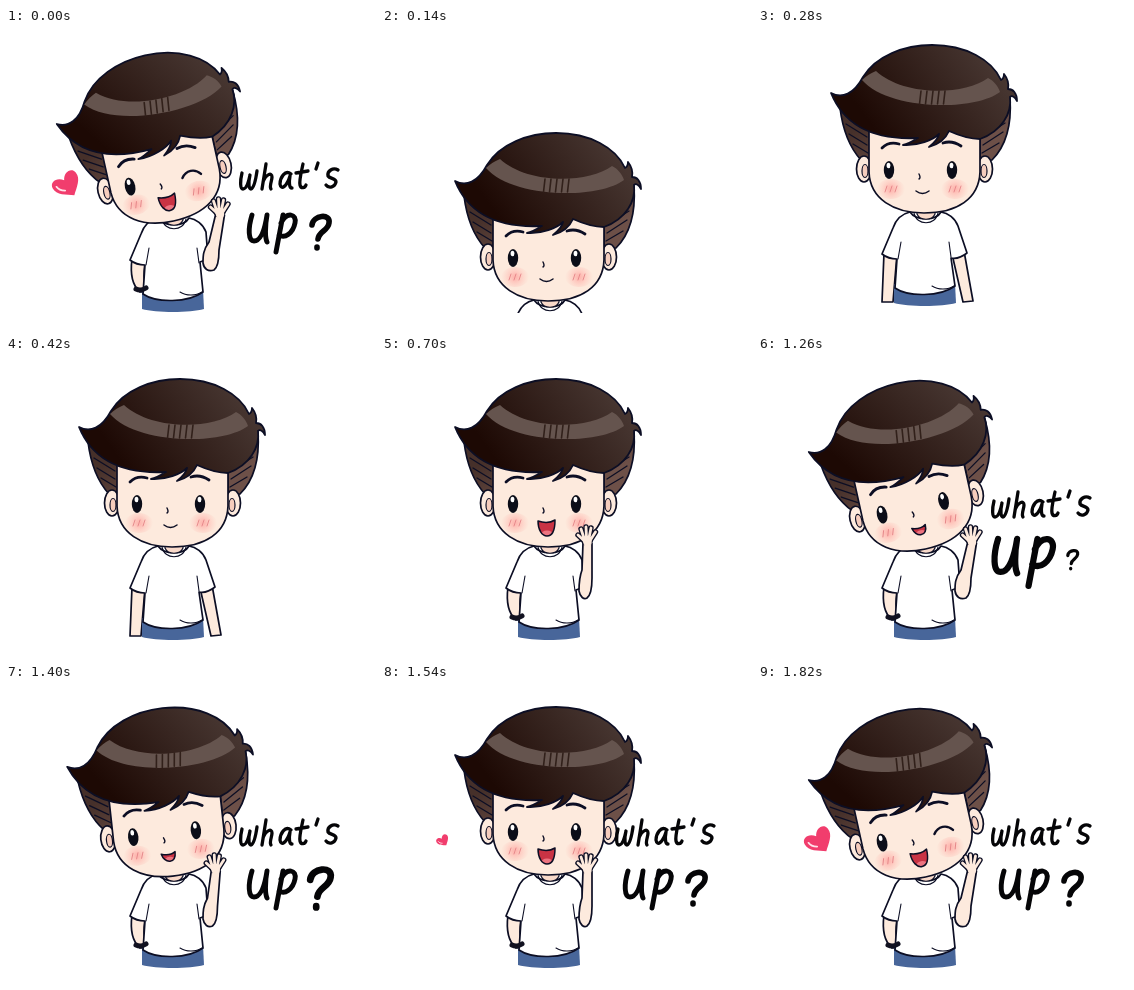
Animation of 370 by 300 pixels, one loop 1.96 s. Source, as an HTML page with a canvas:

```html
<!DOCTYPE html>
<html lang="en">
<head>
<meta charset="utf-8">
<title>what's up?</title>
<style>
html, body { margin: 0; width: 100%; height: 100%; overflow: hidden; background: #fff; }
canvas { display: block; width: 370px; height: 300px; }
</style>
</head>
<body>
<canvas id="stage" width="370" height="300" role="img" aria-label="A boy waves: what's up?"></canvas>
<script>
const ctx = document.getElementById('stage').getContext('2d');
const STEP = 140;
const INK = '#0c0e24', SKIN = '#fdeadd', RED = '#f13d6d';

// Defaults describe the waving boy; each pose lists what differs.
const base = { y: 0, tilt: 0, wave: true, mouth: 'open', wink: false, what: 0, up: 0, ask: 0, heart: 0 };
const idle = { wave: false, mouth: 'closed' };
const poses = [
  { tilt: 1, wink: true, what: 1, up: 1, ask: 1, heart: 1 },
  { ...idle, y: 82 },
  { ...idle, y: -6 },
  idle,
  { ...idle, y: 1 },
  {},
  { what: 0.55 },
  { what: 1.1 },
  { tilt: 0.5, what: 1, up: 0.6 },
  { tilt: 1, mouth: 'grin', what: 1, up: 1.27, ask: 0.58 },
  { tilt: 0.5, mouth: 'grin', what: 1, up: 1, ask: 1.2 },
  { what: 1, up: 1, ask: 1, heart: 0.45 },
  { tilt: 0.5, what: 1, up: 1, ask: 1, heart: 1.2 },
  { tilt: 1, wink: true, what: 1, up: 1, ask: 1, heart: 1 }
].map(p => ({ ...base, ...p }));

const shape = d => new Path2D(d);
const art = {
  hair: shape('M73 71C84 77 96 72 105 55C118 34 146 23 174 23C208 23 234 38 243 58C245 57 246 55 246 52C250 57 251 62 250 67C255 67 259 71 259 79C257 75 254 73 252 75C254 91 244 109 222 117C212 117 202 114 191 109C188 116 182 122 171 125C176 121 180 117 181 112C175 118 160 124 145 123C150 122 155 119 160 116C122 118 88 108 73 71Z'),
  band: shape('M104 58C130 88 215 90 242 70C240 64 236 59 230 56C205 74 145 74 118 49C113 51 108 54 104 58Z'),
  sideL: shape('M82 86C85 110 92 126 103 138L112 142L114 106Z'),
  sideR: shape('M222 110L222 140L234 138C246 126 254 106 252 76Z'),
  strandsL: shape('M88 102L109 115M91 112L109 123M95 122L110 131'),
  strandsR: shape('M247 101L225 115M245 110L225 123M241 121L224 131'),
  face: shape('M111 106L111 150C112 177 136 191 166 191C199 191 221 177 222 150L222 106Z'),
  brows: shape('M124 126C128 122 134 120 141 122M185 121C191 119 197 120 203 124'),
  nose: shape('M161 152C162 154 163 156 161 157'),
  smile: shape('M158 169C162 172 167 172 171 169'),
  open: shape('M156 165C162 167 168 167 173 164C173 174 170 180 165 180C160 180 156 174 156 165Z'),
  grin: shape('M157 168C163 170 167 170 171 167C171 172 169 176 165 176C161 176 158 172 157 168Z'),
  wink: shape('M184 151C189 144 198 144 203 151'),
  neck: shape('M159 184L159 192C162 199 174 199 177 192L177 184Z'),
  shirt: shape('M152 190C143 192 138 197 135 206L124 232C129 236 134 237 139 237L137 266C150 275 182 275 197 264L193 236C198 237 204 235 209 231L200 204C197 196 190 191 183 190C178 199 158 199 152 190Z'),
  waveShirt: shape('M152 190C143 192 138 197 135 206L124 232C129 236 134 237 139 237L137 266C150 275 182 275 197 264L194 234L202 231L200 204C197 196 190 191 183 190C178 199 158 199 152 190Z'),
  folds: shape('M140 237L143 220M193 235L191 220M156 191C158 204 178 204 180 191M174 264C180 268 190 268 196 264'),
  jeans: shape('M136 262L136 281C150 285 184 285 198 281L197 261Z'),
  armL: shape('M126 231L124 280L135 280L139 232'),
  armR: shape('M194 232L205 280L215 279L206 229'),
  pocketArm: shape('M126 231C124 246 127 258 134 264L143 264L139 255C137 250 138 243 139 234Z'),
  watch: shape('M130 261C134 263 137 262 140 260'),
  heart: shape('M0 13C-6 8 -15 3 -14 -5C-13 -12 -4 -12 0 -5C4 -12 13 -12 14 -5C15 3 6 8 0 13Z'),
  glint: shape('M-10 -4C-10 -1 -8 2 -5 4'),
  what: shape('M236 145C234 153 234 161 237 161C241 161 243 152 244 147C242 156 243 161 245 161C248 160 250 150 251 143M260 136L256 161M257 154C260 146 266 144 266 149C266 153 263 158 265 161M285 146C279 141 274 150 274 156C275 163 281 158 284 148C283 154 283 160 286 160M297 136C295 145 293 153 294 157C295 161 299 160 300 157M290 145L302 143M312 135L310 141M332 142C327 139 321 143 322 148C324 151 330 150 330 154C329 159 323 161 320 157'),
  up: shape('M246 187C242 200 242 213 248 213C255 213 259 200 261 187C259 198 259 210 261 214M277 187L270 224M275 195C281 183 291 186 289 195C287 205 279 211 273 207'),
  ask: shape('M306 197C307 187 325 185 323 195C322 203 313 203 312 211M311 219L311 220')
};

function paint(path, fill, line = 1.7, color = INK) {
  if (fill) { ctx.fillStyle = fill; ctx.fill(path); }
  if (line) { ctx.lineWidth = line; ctx.strokeStyle = color; ctx.stroke(path); }
}

function oval(x, y, rx, ry, fill, line = 0) {
  const p = new Path2D();
  p.ellipse(x, y, rx, ry, 0, 0, 7);
  paint(p, fill, line);
}

function scaled(x, y, k, draw) {
  if (!k) return;
  ctx.save();
  ctx.translate(x, y);
  ctx.scale(k, k);
  ctx.translate(-x, -y);
  draw();
  ctx.restore();
}

function gradient(x0, y0, x1, y1, from, to) {
  const g = ctx.createLinearGradient(x0, y0, x1, y1);
  g.addColorStop(0, from);
  g.addColorStop(1, to);
  return g;
}

function body(p) {
  if (p.wave) paint(art.pocketArm, SKIN);
  else { paint(art.armL, SKIN); paint(art.armR, SKIN); }
  paint(art.jeans, '#48669a', 0);
  paint(p.wave ? art.waveShirt : art.shirt, '#fff');
  paint(art.neck, '#f8d9c9', 1.2);
  paint(art.folds, null, 1.1);
  if (p.wave) paint(art.watch, null, 5, '#111120');
}

function cheek(x, y) {
  const g = ctx.createRadialGradient(x, y, 2, x, y, 14);
  g.addColorStop(0, 'rgba(255,165,160,.7)');
  g.addColorStop(1, 'rgba(255,190,180,0)');
  oval(x, y, 14, 10, g);
  for (const d of [-6, -1, 4]) paint(shape(`M${x + d + 2} ${y - 3}l-2 6`), null, 0.9, '#e58588');
}

function eye(x) {
  oval(x, 148, 5.2, 9, '#0b0d18');
  oval(x - 0.5, 143.5, 1.9, 2.8, '#fff');
}

function mouth(kind) {
  if (kind === 'closed') return paint(art.smile, null, 1.5);
  ctx.save();
  ctx.clip(art[kind]);
  ctx.fillStyle = '#c93344';
  ctx.fillRect(150, 160, 30, 25);
  oval(165, kind === 'open' ? 179 : 176, 6, 4.5, '#ec7480');
  ctx.restore();
  paint(art[kind], null, 1.5);
}

function head(p) {
  ctx.save();
  ctx.translate(176, 185);
  ctx.rotate(-12.5 * p.tilt * Math.PI / 180);
  ctx.translate(-176, -185);
  const side = gradient(150, 85, 175, 140, '#46302a', '#6d5048');
  paint(art.sideL, side);
  paint(art.sideR, side);
  paint(art.strandsL, null, 1.3);
  paint(art.strandsR, null, 1.3);
  for (const [x, s] of [[106, 1], [227, -1]]) {
    oval(x, 147, 7.5, 13, SKIN, 1.7);
    oval(x + s, 149, 3, 6.5, '#f6cdbd', 1.2);
  }
  paint(art.face, SKIN);
  cheek(133, 167);
  cheek(197, 167);
  paint(art.hair, gradient(225, 35, 120, 112, '#463530', '#1d0904'), 1.8);
  paint(art.band, '#65544e', 0);
  for (let x = 163; x < 190; x += 6) paint(shape(`M${x} 69l-1.5 13`), null, 1.6, '#31201a');
  paint(art.brows, null, 2.8);
  eye(131);
  if (p.wink) paint(art.wink, null, 2.4);
  else eye(194);
  paint(art.nose, null, 1.4);
  mouth(p.mouth);
  ctx.restore();
}

function hand(tilt) {
  const x = 205 + 8.5 * tilt, e = 3 * tilt;
  paint(shape(`M${x - 4} 187L${200 + e} 214C197 222 197 228 197 235C198 241 202 244 ${205 + e} 242C${209 + e} 239 ${210 + e} 232 ${210 + e} 222L${x + 5} 187`), SKIN);
  const tips = [[-9, 179], [-6, 173], [-1, 171], [4, 172], [8.5, 176]];
  const fingers = shape(tips.map(([dx, y]) => `M${x + dx * 0.4} 184L${x + dx} ${y}`).join(''));
  paint(fingers, null, 5.4);
  oval(x, 184, 5.3, 5, SKIN, 1.5);
  paint(fingers, null, 2.8, SKIN);
  oval(x + 0.5, 186, 4.2, 5, SKIN);
}

function words(p) {
  const ink = '#050507';
  scaled(p.what < 1 ? 236 : 283, 149, p.what, () => paint(art.what, null, 3.3, ink));
  scaled(268, 202, p.up, () => paint(art.up, null, 4.9, ink));
  scaled(315, 203, p.ask, () => paint(art.ask, null, 5.6, ink));
}

function heart(k) {
  if (!k) return;
  ctx.save();
  ctx.translate(61, 156.5);
  ctx.rotate(-0.6);
  ctx.scale(k, k);
  paint(art.heart, RED, 0);
  paint(art.glint, null, 1.8, '#ffe3ea');
  ctx.restore();
}

function render(now) {
  const p = poses[Math.floor(now / STEP) % poses.length];
  ctx.fillStyle = '#fff';
  ctx.fillRect(0, 0, 370, 300);
  ctx.lineCap = ctx.lineJoin = 'round';
  ctx.save();
  ctx.beginPath();
  ctx.rect(0, 0, 370, 285);
  ctx.clip();
  ctx.translate(0, p.y);
  body(p);
  head(p);
  if (p.wave) hand(p.tilt);
  ctx.restore();
  words(p);
  heart(p.heart);
}

const start = performance.now();
function tick() {
  render(performance.now() - start);
  requestAnimationFrame(tick);
}
tick();
</script>
</body>
</html>
```
